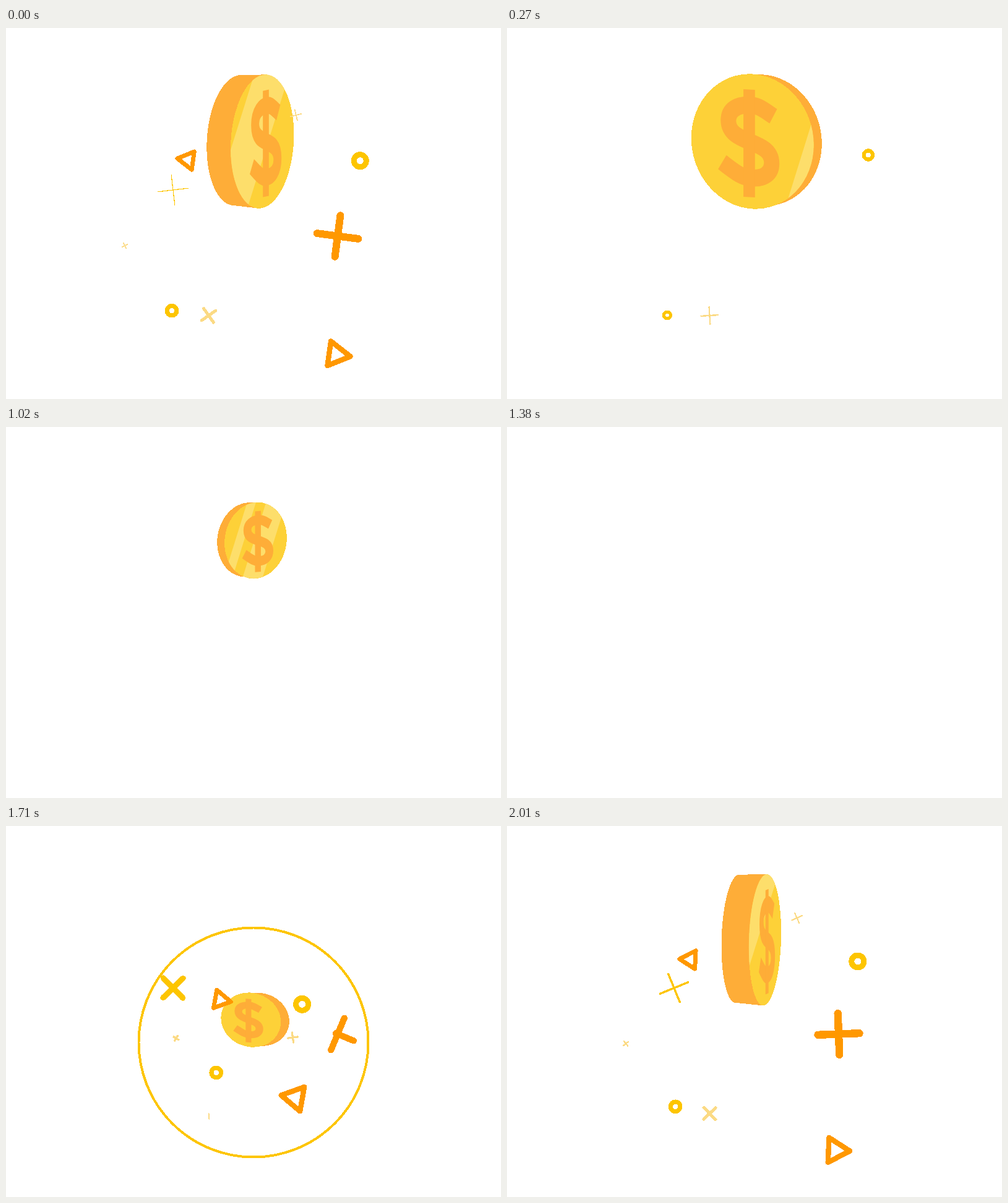
An HTML page that plays this animation: 800x600 px, repeating every 2.04 s.

```html
<!DOCTYPE html>
<html lang="en">
<head>
<meta charset="utf-8">
<title>Coin burst</title>
<style>
  html, body { margin: 0; width: 100%; height: 100%; overflow: hidden; background: #fff; }
  svg { display: block; width: 800px; height: 600px; }
</style>
</head>
<body>
<svg viewBox="0 0 800 600" fill="none">
  <defs><clipPath id="faceClip"><circle id="clipCircle" r="109"/></clipPath></defs>
  <g id="rings" shape-rendering="crispEdges"></g>
  <g id="coin">
    <g fill="#fead38" shape-rendering="crispEdges">
      <circle id="back" r="106.3"/>
      <path id="side"/>
    </g>
    <circle id="front" r="109" fill="#fdd138" shape-rendering="crispEdges"/>
    <g clip-path="url(#faceClip)">
      <path id="shine" fill="#fdde6b" d="M0-125H57V125H0ZM-54-125H-29V125H-54Z"/>
    </g>
    <g id="dollar">
      <path stroke="#fead38" stroke-width="27.5" d="M43-43C25-53 16-59 2-59C-20-59-37-50-37-32C-37-12-18-6 0 0C22 7 40 13 40 33C40 50 26 59 4 59C-14 59-26 50-48 36"/>
      <path fill="#fead38" d="M-10.3-84H10.3V90H-10.3Z"/>
    </g>
  </g>
  <g id="bits" shape-rendering="crispEdges" stroke-linecap="round" stroke-linejoin="round"></g>
</svg>
<script>
const LOOP = 2040, STEP = 30, BIRTH = 1380;
const ORANGE = '#ff9800', YELLOW = '#fdc500', PALE = '#fbda84';
const byId = id => document.getElementById(id);
const set = (el, attrs) => { for (const k in attrs) el.setAttribute(k, attrs[k]); };
const show = visible => visible ? 'inline' : 'none';

function add(parent, tag, attrs) {
  const el = document.createElementNS('http://www.w3.org/2000/svg', tag);
  set(el, attrs);
  return byId(parent).appendChild(el);
}

const ramp = (t, start, time) => Math.min(1, Math.max(0, (t - start) / time));
const swing = (t, start, time) => .5 - .5 * Math.cos(Math.PI * ramp(t, start, time));
function inOut(t, start, time, power) {
  const u = ramp(t, start, time);
  return u < .5 ? Math.pow(2 * u, power) / 2 : 1 - Math.pow(2 - 2 * u, power) / 2;
}

// Times run from the burst on: BIRTH .. BIRTH + LOOP.
function drawCoin(t) {
  const grow = inOut(t, 1560, 530, 2);
  const size = 1 - inOut(t, 2715, 740, 2);
  const sx = size * (.49 + .51 * grow), sy = size * (.29 + .71 * grow);
  const y = 354 - 170.5 * inOut(t, 1480, 590, 3);
  const alpha = ramp(t, 1490, 80);
  const shown = alpha > 0 && size > .01;
  set(byId('coin'), {
    display: show(shown), opacity: alpha,
    transform: `translate(400 ${y}) scale(${sx} ${sy})`
  });
  if (!shown) return;

  // Two half turns; both sides of the coin look the same.
  const angle = -36 - 180 * (inOut(t, 1545, 1020, 3) + inOut(t, 2580, 893, 3));
  const turn = ((angle + 90) % 180 + 180) % 180 - 90;
  const s = Math.sin(turn * Math.PI / 180), c = Math.cos(turn * Math.PI / 180);
  const shear = -.12 * s;
  const frontX = 18.5 * s * Math.abs(s), backX = -29.5 * s;
  const place = (x, y) => ({ transform: `matrix(${c} ${shear} 0 1 ${x} ${y})` });
  set(byId('front'), place(frontX, 0));
  set(byId('clipCircle'), place(frontX, 0));
  set(byId('back'), place(backX, -2));
  set(byId('dollar'), place(frontX + 14 * s * c, 0));

  // The rim joins the highest and lowest points of both discs.
  const high = Math.hypot(1, shear), lean = c * shear / high;
  const tip = (x, y, r) => `${x + r * lean} ${y + r * high}`;
  set(byId('side'), { d: `M${tip(backX, -2, -106.3)}L${tip(frontX, 0, -109)}`
    + `L${tip(frontX, 0, 109)}L${tip(backX, -2, 106.3)}Z` });

  const sweep = t < 2550 ? -33 + .63 * (t - 2040) : 2 + .63 * (t - 3060);
  set(byId('shine'), { transform: `translate(${sweep}) skewX(-17.3)` });
}

// A ring grows steadily and thins to nothing.
function ring(color, start) {
  const el = add('rings', 'circle', { cx: 400, cy: 350, stroke: color });
  return t => {
    const u = ramp(t, start, 287);
    set(el, { r: 242 * u, 'stroke-width': 17 * (1 - u), display: show(u > 0 && u < .985) });
  };
}

function triangle(dx, dy, r, width, angle) {
  const x = -r / 2, y = r * Math.sqrt(3) / 2;
  const el = add('bits', 'path', { d: `M${r} 0L${x} ${y}L${x} ${-y}Z`, stroke: ORANGE, 'stroke-width': width });
  return t => {
    const p = swing(t, 1320, 785);
    const size = ramp(t, 1440, 110) - ramp(t, 2050, 190);
    set(el, {
      display: show(size > 0),
      transform: `translate(${400 + dx * p} ${350 + dy * p}) rotate(${angle + .175 * (t - LOOP)}) scale(${size})`
    });
  };
}

function circle(dx, dy, r, width) {
  const el = add('bits', 'circle', { r, stroke: YELLOW, 'stroke-width': width });
  return t => {
    const p = swing(t, 1320, 860);
    const size = ramp(t, 1450, 110) - ramp(t, 2200, 380);
    set(el, {
      display: show(size > 0),
      transform: `translate(${400 + dx * p} ${350 + dy * p}) scale(${size})`
    });
  };
}

// A cross grows arm by arm from its middle, spins ever faster and thins out.
function cross({ color, at, start, life, length, width, angle, spin, armTime = .075 }) {
  const el = add('bits', 'path', { stroke: color });
  return t => {
    const u = ramp(t, start, life), [x, y] = at(t);
    const len = length * (.7 + .3 * ramp(t, start, 400));
    let d = '';
    [0, 180, 270, 90].forEach((side, i) => {
      const p = ramp(u, i * armTime, armTime);
      const a = (angle + spin * u * u + side) * Math.PI / 180;
      if (p > 0) d += `M0 0L${len * p * Math.cos(a)} ${len * p * Math.sin(a)}`;
    });
    set(el, {
      d, display: show(u > 0 && u < 1),
      'stroke-width': width * Math.pow(Math.abs(Math.sin(Math.PI * u)), .6),
      transform: `translate(${x} ${y})`
    });
  };
}

const parts = [
  drawCoin,
  ring(ORANGE, 1424),
  ring(YELLOW, 1490),
  circle(184, -144.5, 10, 9),
  circle(-141, 114.5, 7.7, 7.3),
  triangle(-108, -139, 17, 7, 68),
  triangle(136, 181, 23, 8.5, 8),
  cross({ color: YELLOW, at: () => [270, 262], start: 1425, life: 622,
          length: 24.5, width: 9.3, angle: 101, spin: 166 }),
  cross({ color: ORANGE, at: () => [536, 336.5], start: 1530, life: 770,
          length: 33.5, width: 13, angle: 102, spin: 195 }),
  cross({ color: PALE, at: () => [327.5, 465], start: 1665, life: 710,
          length: 14, width: 5, angle: 83, spin: 222 }),
  cross({ color: PALE, at: t => [458 + 11 * swing(t, 1320, 785), 546 - 412 * swing(t, 1320, 785)],
          start: 1440, life: 680, length: 9, width: 3.3, angle: 61, spin: 135, armTime: .03 }),
  cross({ color: PALE, at: t => [394 - 202 * swing(t, 1320, 700), 331 + 21 * swing(t, 1320, 700)],
          start: 1440, life: 680, length: 5, width: 3.5, angle: 0, spin: 200, armTime: .03 })
];

const begin = performance.now();
function tick() {
  const now = Math.max(0, performance.now() - begin) % LOOP;
  const t = Math.floor(now / STEP) * STEP;
  const life = t < BIRTH ? t + LOOP : t;
  parts.forEach(draw => draw(life));
  requestAnimationFrame(tick);
}
tick();
</script>
</body>
</html>
```
